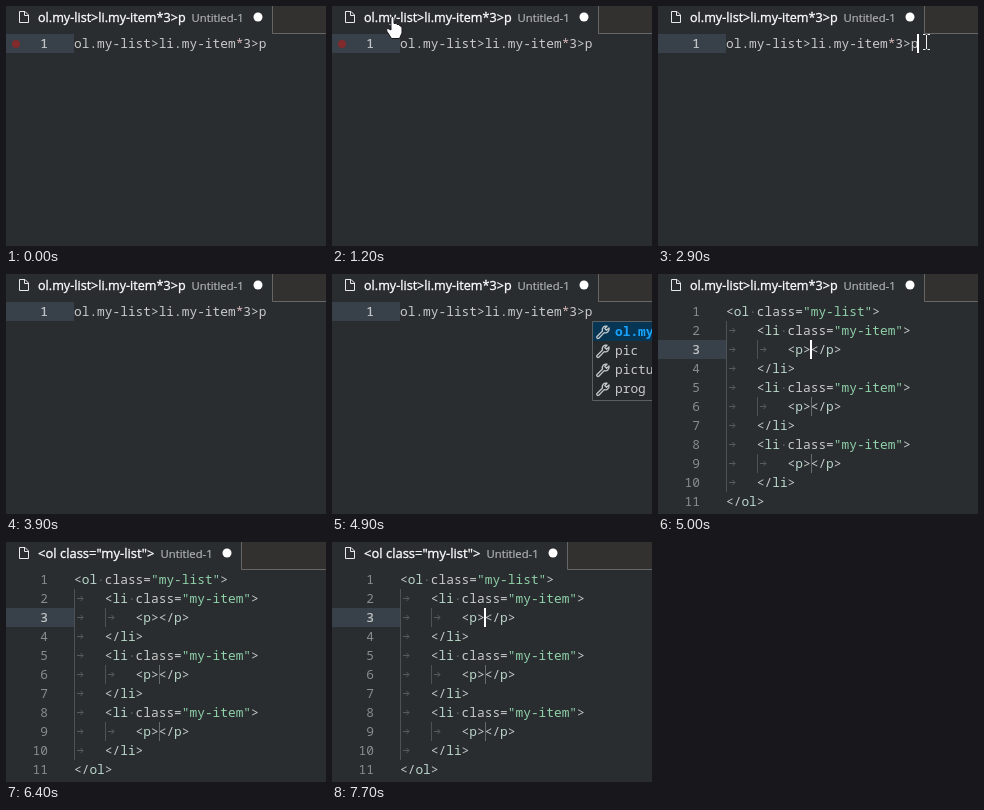
An HTML page for the animation above (8000 ms loop, 320x240 px).

```html
<!DOCTYPE html>
<html lang="en">
<head>
<meta charset="utf-8">
<title>Abbreviation expansion</title>
<style>
html, body { margin: 0; width: 100%; height: 100%; overflow: hidden; background: #2a2d30; }
svg { display: block; width: 100%; height: 100%; }
.mono { font: 12.83px "Noto Sans Mono", monospace; fill: #c8cbc9; }
.title { font: 12.6px "Open Sans", sans-serif; fill: #fff; stroke: #fff; stroke-width: .3; }
.path { font: 11.3px "Open Sans", sans-serif; fill: #b0b3b5; stroke: #b0b3b5; stroke-width: .2; }
.number { fill: #878c91; text-anchor: end; }
.current { fill: #c6c8ca; stroke: #c6c8ca; stroke-width: .2; }
.tag { fill: #b9d6c8; }
.string { fill: #8fd1a9; }
.dim { fill: #62676b; }
.star { fill: #d8babb; }

/* One loop is 8 s, so 1.25% is 100 ms. */
.timed { animation: 8s step-end infinite; }
#dot { animation-name: dot; }
#short { animation-name: before-expand; }
#long { animation-name: after-expand; }
#tab-short { animation-name: before-title; }
#tab-long { animation-name: after-title; }
#popup { animation-name: popup; }
#hand { animation-name: hand; }
#beam { animation-name: beam; }
#caret { animation-name: caret; }

@keyframes dot { 0% { opacity: 1 } 16.25%, 100% { opacity: 0 } }
@keyframes before-expand { 0% { opacity: 1 } 62.5%, 100% { opacity: 0 } }
@keyframes after-expand { 0% { opacity: 0 } 62.5%, 100% { opacity: 1 } }
@keyframes before-title { 0% { opacity: 1 } 63.75%, 100% { opacity: 0 } }
@keyframes after-title { 0% { opacity: 0 } 63.75%, 100% { opacity: 1 } }
@keyframes popup { 0% { opacity: 0 } 51.25% { opacity: 1 } 62.5%, 100% { opacity: 0 } }
@keyframes hand { 0% { opacity: 0 } 15% { opacity: 1 } 16.25%, 100% { opacity: 0 } }
@keyframes beam {
  0% { opacity: 0; transform: translate(62px, 20px) }
  16.25% { opacity: 1; transform: translate(94px, 33px) }
  17.5% { opacity: 1; transform: translate(148px, 38px) }
  18.75% { opacity: 1; transform: translate(200px, 38px) }
  20% { opacity: 1; transform: translate(237px, 34px) }
  21.25% { opacity: 1; transform: translate(252px, 30px) }
  23.75% { opacity: 1; transform: translate(261px, 31px) }
  25% { opacity: 1; transform: translate(265px, 32px) }
  26.25% { opacity: 1; transform: translate(267px, 33px) }
  28.75% { opacity: 1; transform: translate(269px, 35px) }
  36.25% { opacity: 1; transform: translate(268px, 36px) }
  37.5%, 100% { opacity: 0; transform: translate(268px, 36px) }
}
@keyframes caret {
  0% { opacity: 0; transform: translate(259px, 28px) }
  32.5% { opacity: 1; transform: translate(259px, 28px) }
  38.75% { opacity: 0; transform: translate(259px, 28px) }
  43.75% { opacity: 1; transform: translate(259px, 28px) }
  48.75% { opacity: 0; transform: translate(259px, 28px) }
  55% { opacity: 1; transform: translate(259px, 28px) }
  61.25% { opacity: 0; transform: translate(259px, 28px) }
  62.5% { opacity: 1; transform: translate(152px, 66px) }
  68.75% { opacity: 0; transform: translate(152px, 66px) }
  73.75% { opacity: 1; transform: translate(152px, 66px) }
  80% { opacity: 0; transform: translate(152px, 66px) }
  85% { opacity: 1; transform: translate(152px, 66px) }
  91.25% { opacity: 0; transform: translate(152px, 66px) }
  96.25%, 100% { opacity: 1; transform: translate(152px, 66px) }
}
</style>
</head>
<body>
<svg viewBox="0 0 320 240" xmlns="http://www.w3.org/2000/svg">
  <defs>
    <g id="bar">
      <path d="M0 0h90v28H0z" fill="#333130"/>
      <path d="M.5 0v27.5H90" fill="none" stroke="#666"/>
      <circle cx="-14" cy="11" r="4.5" fill="#fff"/>
    </g>
    <path id="wrench" fill="none" stroke="#c5c8ca" stroke-width="1.3" stroke-linejoin="round"
      d="M1 11.5 6.5 6C5.5 3 8 .5 11 1.2L8.8 3.5 10.5 5.3 13 3C13.800 6 11 8.5 8.2 7.6L2.8 13.2C1.5 14 0 12.7 1 11.5z"/>
  </defs>

  <g id="tab-short" class="timed">
    <text class="title" x="32" y="16">ol.my-list&gt;li.my-item*3&gt;p</text>
    <text class="path" x="185.5" y="16">Untitled-1</text>
    <use href="#bar" x="266"/>
  </g>
  <g id="tab-long" class="timed">
    <text class="title" x="32" y="16" style="font-size:13px">&lt;ol class="my-list"&gt;</text>
    <text class="path" x="154.5" y="16">Untitled-1</text>
    <use href="#bar" x="235"/>
  </g>
  <path d="M13.5 5.5h5.5l3.5 3.5v7.5h-9zM18.5 5.5v4h4" fill="none" stroke="#e8e9ea"/>

  <g id="short" class="timed mono">
    <path d="M0 28h68v19H0z" fill="#384149"/>
    <text class="number current" x="42" y="42">1</text>
    <text x="68" y="42">ol.my-list&gt;li.my-item<tspan class="star">*</tspan>3&gt;p</text>
  </g>
  <circle id="dot" class="timed" cx="10" cy="38" r="4" fill="#812b2c"/>

  <g id="long" class="timed mono">
    <path d="M0 66h68v19H0z" fill="#384149"/>
  </g>

  <g id="popup" class="timed mono">
    <path d="M260.5 47.5h70v79h-70z" fill="#272a2d" stroke="#5b6064"/>
    <path d="M261 48h60v19h-60z" fill="#073655"/>
    <text x="283" y="62" style="fill:#18a3ff;font-weight:bold">ol.my-list</text>
    <text x="283" y="81">pic</text>
    <text x="283" y="100">picture</text>
    <text x="283" y="119">prog</text>
    <use href="#wrench" x="264" y="51"/>
    <use href="#wrench" x="264" y="70"/>
    <use href="#wrench" x="264" y="89"/>
    <use href="#wrench" x="264" y="108"/>
  </g>

  <path id="caret" class="timed" d="M0 0h2v19H0z" fill="#fff"/>
  <path id="beam" class="timed" d="M-3 -7.5H-.5M1.5 -7.5H4M.5 -7V7M-3 7.5H-.5M1.5 7.5H4" fill="none" stroke="#f2f2f2"/>
  <path id="hand" class="timed" fill="#fff" stroke="#16181a" stroke-linejoin="round"
    d="M59 24V12.5Q59 10.5 60.5 10.5T62 12.5V17.5Q64.5 16.5 65 18.5Q67.5 17.5 68 20Q70 19.5 70 22V27L67.5 32.5H59.5L55 25.5Q53.5 22.5 56 22.5Z"/>
</svg>

<script>
const NS = 'http://www.w3.org/2000/svg';
const editor = document.getElementById('long');
const INDENT = 30.8, LEFT = 68, ROW = 19;

function add(parent, name, attrs, text = '') {
  const node = document.createElementNS(NS, name);
  for (const key in attrs) node.setAttribute(key, attrs[key]);
  node.textContent = text;
  return parent.appendChild(node);
}

const open = (tag, cls) => [
  ['', '<'], ['tag', tag], ['dim', '·'], ['', 'class='], ['string', `"${cls}"`], ['', '>']
];
const close = tag => [['', '</'], ['tag', tag], ['', '>']];
const item = [
  [1, open('li', 'my-item')],
  [2, [['', '<'], ['tag', 'p'], ['', '>'], ...close('p')]],
  [1, close('li')]
];
const lines = [[0, open('ol', 'my-list')], ...item, ...item, ...item, [0, close('ol')]];

lines.forEach(([depth, parts], i) => {
  const top = 28 + i * ROW, y = top + 14;
  add(editor, 'text', { class: i === 2 ? 'number current' : 'number', x: 42, y }, i + 1);
  for (let level = 0; level < depth; level++) {
    const x = Math.round(LEFT + level * INDENT);
    add(editor, 'path', { d: `M${x + .5} ${top}v${ROW}`, stroke: '#4d5256' });
    add(editor, 'path', {
      d: `M${x + 3} ${top + 9.5}h6m-2.5 -2.5l2.5 2.5l-2.5 2.5`,
      fill: 'none', stroke: '#565b5f'
    });
  }
  const text = add(editor, 'text', { x: LEFT + depth * INDENT, y });
  for (const [kind, value] of parts) add(text, 'tspan', { class: kind }, value);
  // Remaining tab stops of the expanded snippet
  if (depth === 2 && i > 2) add(editor, 'path', { d: `M153.5 ${top}v${ROW}`, stroke: '#666b6f' });
});
</script>
</body>
</html>
```
